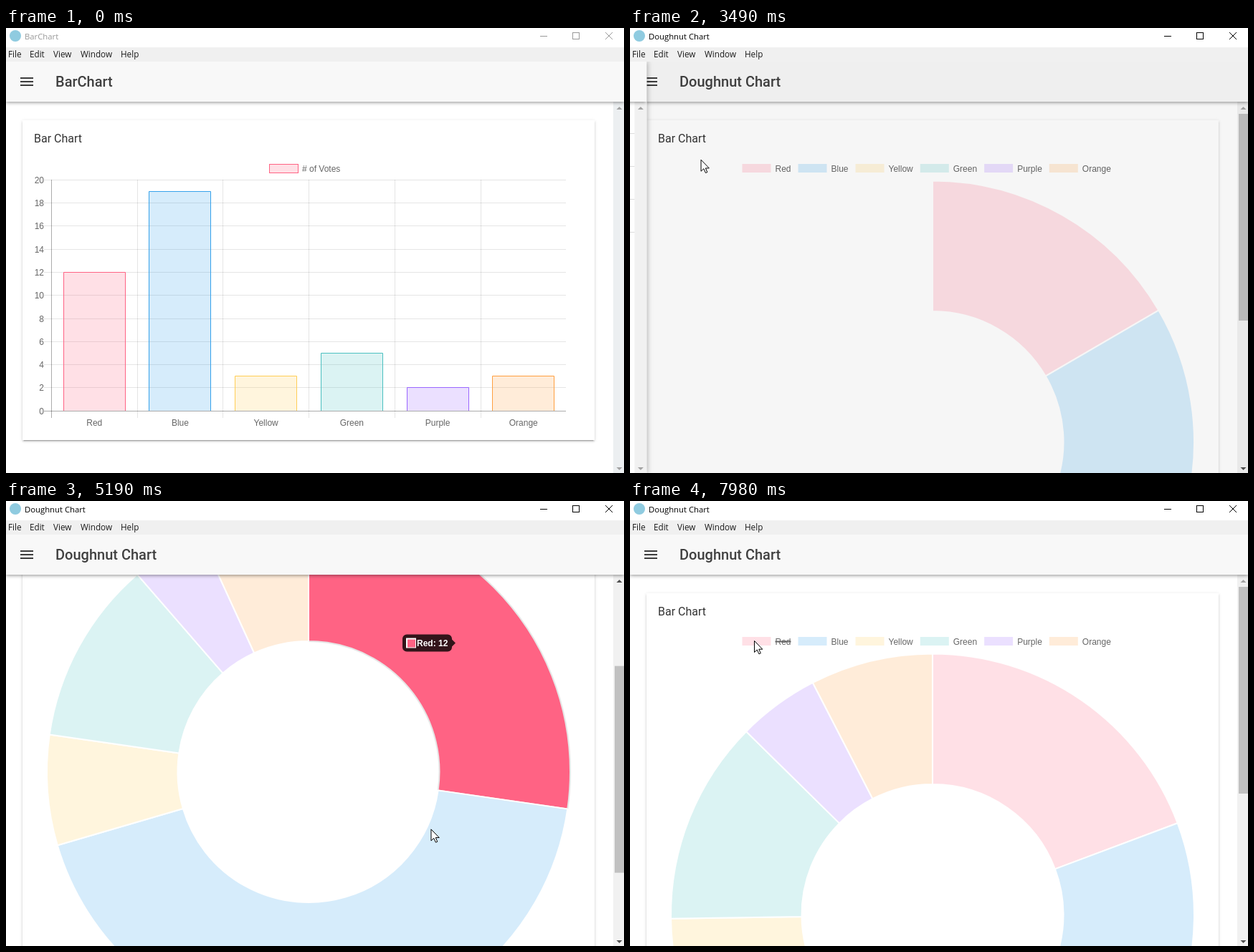
An HTML page with a canvas that plays this animation: 862 by 622 pixels, repeating every 8000 ms.

```html
<!DOCTYPE html>
<html lang="en">
<head>
<meta charset="utf-8">
<title>Charts</title>
<style>
  html, body { margin: 0; width: 100%; height: 100%; overflow: hidden; background: #fff; }
  canvas { display: block; }
</style>
</head>
<body>
<canvas id="stage" width="862" height="622"></canvas>
<script>
const ctx = document.getElementById('stage').getContext('2d');
const W = 862, H = 622, LOOP = 8000, TOP = 103, PAGE_W = 847;
const TAU = Math.PI * 2;
const UI = '"Open Sans", "Noto Sans", sans-serif';
const APP = 'Roboto, sans-serif';
const CHART = '12px "Liberation Sans", Arial, sans-serif';

const LABELS = ['Red', 'Blue', 'Yellow', 'Green', 'Purple', 'Orange'];
const VOTES = [12, 19, 3, 5, 2, 3];
const RGB = ['255,99,132', '54,162,235', '255,206,86', '75,192,192', '153,102,255', '255,159,64'];
const MENU = ['BarChart', 'DoughnutChart', 'LineChart', 'PolarChart', 'RadarChart'];
const tint = (i, a) => `rgba(${RGB[i]},${a})`;

// Event times in ms
const FOCUS = 1690, OPEN = 1810, SWITCH = 3330, GROW = 3282, HIDE = 7898;
const RING = { x: 422, y: 578.5, out: 365, inn: 182.5 };

// time, x, y of the pointer tip
const POINTER = [
  [230, 544, 594], [620, 320, 330], [1000, 91, 90], [1080, 87, 89], [1310, 53, 83],
  [1460, 40, 79], [2150, 40, 79], [2320, 50, 85], [2550, 80, 118], [2800, 80, 118],
  [3100, 92, 173], [3330, 92, 173], [3600, 103, 191], [4120, 103, 191], [4450, 380, 265],
  [4750, 600, 310], [5000, 625, 360], [5100, 620, 395], [5190, 593, 458], [5400, 480, 530],
  [5700, 300, 430], [5950, 235, 320], [6200, 200, 268], [6360, 195, 254], [6700, 195, 254],
  [7000, 150, 150], [7220, 125, 50], [7510, 145, 178], [7660, 173, 195]
];
const SCROLL = [
  [4560, 0], [4700, 100], [5000, 100], [5110, 200], [5900, 200], [6030, 300],
  [6790, 300], [6910, 200], [7040, 200], [7160, 100], [7290, 100], [7410, 0]
];

const clamp = v => Math.max(0, Math.min(1, v));
const easeOut = (v, n) => 1 - Math.pow(1 - clamp(v), n);

function track(keys, t) {
  if (t <= keys[0][0]) return keys[0].slice(1);
  for (let i = 1; i < keys.length; i++) {
    const a = keys[i - 1], b = keys[i];
    if (t < b[0]) {
      const k = (t - a[0]) / (b[0] - a[0]);
      return a.slice(1).map((v, j) => v + (b[j + 1] - v) * k);
    }
  }
  return keys[keys.length - 1].slice(1);
}

function rect(x, y, w, h, color) {
  ctx.fillStyle = color;
  ctx.fillRect(x, y, w, h);
}

function text(str, x, y, font, color, align = 'left') {
  ctx.font = font;
  ctx.fillStyle = color;
  ctx.textAlign = align;
  ctx.fillText(str, x, y);
}

function line(x1, y1, x2, y2, color, width = 1) {
  ctx.strokeStyle = color;
  ctx.lineWidth = width;
  ctx.beginPath();
  ctx.moveTo(x1, y1);
  ctx.lineTo(x2, y2);
  ctx.stroke();
}

function shadowRect(x, y, w, h, color, dy, blur, alpha) {
  ctx.save();
  ctx.shadowColor = `rgba(0,0,0,${alpha})`;
  ctx.shadowOffsetY = dy;
  ctx.shadowBlur = blur;
  rect(x, y, w, h, color);
  ctx.restore();
}

function triangle(x, y, dir, color) {
  ctx.fillStyle = color;
  ctx.beginPath();
  ctx.moveTo(x - 4, y + 2 * dir);
  ctx.lineTo(x + 4, y + 2 * dir);
  ctx.lineTo(x, y - 2 * dir);
  ctx.fill();
}

function windowBar(t) {
  const active = t >= FOCUS, ink = active ? '#000' : '#999';
  rect(0, 0, W, 27, '#fff');
  rect(0, 27, W, 20, '#f0f0f0');
  ctx.fillStyle = '#8fcbe0';
  ctx.beginPath();
  ctx.arc(13, 11, 8, 0, TAU);
  ctx.fill();
  text(t < SWITCH ? 'BarChart' : 'Doughnut Chart', 26, 16, '11.3px ' + UI, ink);
  line(745, 11.5, 755, 11.5, ink);
  ctx.strokeRect(790.5, 6.5, 9, 9);
  line(836, 6, 846, 16, ink);
  line(846, 6, 836, 16, ink);
  [['File', 3], ['Edit', 33], ['View', 66], ['Window', 104], ['Help', 160]]
    .forEach(([s, x]) => text(s, x, 41, '11.7px ' + UI, '#1a1a1a'));
}

function toolbar(t) {
  shadowRect(0, 47, W, 56, '#f8f8f8', 1, 5, 0.45);
  for (const y of [69, 74, 79]) rect(20, y, 18, 2, '#3c3c3c');
  text(t < SWITCH ? 'BarChart' : 'Doughnut Chart', 69, 82, '500 20px ' + APP, '#404040');
}

function card(bottom) {
  const h = bottom - 129;
  shadowRect(25, 131, 794, h - 4, '#fff', 3, 1, 0.2);
  shadowRect(23, 129, 798, h, '#fff', 2, 2, 0.14);
  shadowRect(23, 129, 798, h, '#fff', 1, 5, 0.12);
  text('Bar Chart', 39, 160, '16px ' + APP, '#333');
}

function barChart() {
  card(576);
  rect(367, 190, 40, 12, tint(0, 0.2));
  ctx.strokeStyle = tint(0, 1);
  ctx.lineWidth = 1;
  ctx.strokeRect(367.5, 190.5, 40, 12);
  text('# of Votes', 413, 201, CHART, '#666');

  const step = 119.7, unit = 16.15;
  for (let v = 0; v <= 20; v += 2) {
    const y = Math.floor(535.3 - v * unit) + 0.5;
    line(53, y, 781, y, v ? 'rgba(0,0,0,.1)' : 'rgba(0,0,0,.33)');
    text(v, 53, y + 4, CHART, '#666', 'right');
  }
  LABELS.forEach((label, i) => {
    const x = Math.floor(63.5 + i * step) + 0.5, mid = 63.4 + (i + 0.5) * step;
    line(x, 212, x, 545, i ? 'rgba(0,0,0,.1)' : 'rgba(0,0,0,.33)');
    const l = Math.floor(mid - 43) + 0.5, r = l + 86;
    const y = Math.floor(535.3 - VOTES[i] * unit) + 0.5;
    rect(l, y, r - l, 535 - y, tint(i, 0.2));
    ctx.strokeStyle = tint(i, 1);
    ctx.beginPath();
    ctx.moveTo(l, 535);
    ctx.lineTo(l, y);
    ctx.lineTo(r, y);
    ctx.lineTo(r, 535);
    ctx.stroke();
    text(label, mid, 556, CHART, '#666', 'center');
  });
}

// Arc angles, clockwise from the top
function slices(t) {
  const grow = easeOut((t - GROW) / 1000, 4);
  const hide = easeOut((t - HIDE) / 1000, 4);
  let at = 0;
  return VOTES.map((v, i) => {
    const after = i ? v / 32 : 0;
    const size = (v / 44 + (after - v / 44) * hide) * TAU * grow;
    const s = { from: at, to: at + size };
    at += size;
    return s;
  });
}

function hovered(t, arcs) {
  if (t < 4200 || t >= 7510) return -1;
  const [x, y] = track(POINTER, t - 90), [scroll] = track(SCROLL, t - 90);
  if (y < TOP) return -1;
  const dx = x - RING.x, dy = y + scroll - RING.y, d = Math.hypot(dx, dy);
  if (d < RING.inn || d > RING.out) return -1;
  const a = (Math.atan2(dx, -dy) + TAU) % TAU;
  return arcs.findIndex(s => a >= s.from && a < s.to);
}

function tooltip(i, arc) {
  const mid = (arc.from + arc.to) / 2, r = (RING.inn + RING.out) / 2;
  const px = RING.x + Math.sin(mid) * r, y = Math.round(RING.y - Math.cos(mid) * r) - 12.5;
  const label = `${LABELS[i]}: ${VOTES[i]}`;
  ctx.font = 'bold ' + CHART;
  const w = Math.round(ctx.measureText(label).width + 26);
  const x = Math.round(px > RING.x ? px - 7 - w : px + 7);
  ctx.fillStyle = 'rgba(0,0,0,.8)';
  ctx.beginPath();
  ctx.roundRect(x, y, w, 24, 6);
  ctx.moveTo(x + w, y + 7);
  ctx.lineTo(x + w + 5, y + 12);
  ctx.lineTo(x + w, y + 17);
  ctx.fill();
  rect(x + 5, y + 5, 14, 14, '#fff');
  rect(x + 7, y + 7, 11, 11, tint(i, 1));
  text(label, x + 20, y + 16.5, 'bold ' + CHART, '#fff');
}

function doughnut(t) {
  card(960);
  let x = 156.5;
  LABELS.forEach((label, i) => {
    rect(x, 190, 40, 12, tint(i, 0.2));
    text(label, x + 46, 201, CHART, '#666');
    const w = ctx.measureText(label).width;
    if (!i && t >= HIDE) line(x + 46, 196.5, x + 46 + w, 196.5, '#666', 2);
    x += 56 + w;
  });

  const arcs = slices(t), hot = hovered(t, arcs), q = TAU / 4;
  ctx.lineJoin = 'bevel';
  arcs.forEach((s, i) => {
    if (s.to - s.from < 1e-4) return;
    ctx.beginPath();
    ctx.arc(RING.x, RING.y, RING.out, s.from - q, s.to - q);
    ctx.arc(RING.x, RING.y, RING.inn, s.to - q, s.from - q, true);
    ctx.closePath();
    ctx.fillStyle = tint(i, i === hot ? 1 : 0.2);
    ctx.fill();
    ctx.strokeStyle = i === hot ? '#e6e6e6' : '#fff';
    ctx.lineWidth = 2;
    ctx.stroke();
  });
  if (hot >= 0) tooltip(hot, arcs[hot]);
}

function scrollbar(t, scroll) {
  const long = t >= SWITCH;
  rect(PAGE_W, TOP, 15, H - TOP, long ? '#f1f1f1' : '#eceff1');
  if (long) rect(849, 120 + scroll * 0.553, 13, 289, '#c1c1c1');
  triangle(855.5, 112, 1, scroll > 1 ? '#505050' : '#a3a3a3');
  triangle(855.5, 616, -1, long ? '#505050' : '#a3a3a3');
}

function sideMenu(t) {
  const p = t < SWITCH ? easeOut((t - OPEN) / 380, 3) : 1 - easeOut((t - SWITCH + 40) / 380, 3);
  if (p <= 0) return;
  ctx.save();
  ctx.beginPath();
  ctx.rect(0, 47, W, H - 47);
  ctx.clip();
  rect(0, 47, W, H - 47, `rgba(0,0,0,${0.355 * p})`);
  ctx.translate(-310 * (1 - p), 0);
  shadowRect(0, 47, 301, H - 47, '#fefefe', 0, 8, 0.4);
  ctx.beginPath();
  ctx.rect(0, 47, 301, H - 47);
  ctx.clip();
  rect(284, TOP, 17, H - TOP, '#f1f1f1');
  triangle(292.5, 112, 1, '#a3a3a3');
  triangle(292.5, 616, -1, '#a3a3a3');
  shadowRect(0, 47, 301, 56, '#f8f8f8', 1, 5, 0.45);
  text('Menu', 13, 82, '500 20px ' + APP, '#404040');
  MENU.forEach((item, i) => {
    text(item, 13, 130 + i * 46, '16px ' + APP, '#2c2c2c');
    if (i) rect(13, 101 + i * 46, 271, 1, '#dcdcdc');
  });
  ctx.restore();
}

const ARROW = new Path2D('M.5 .5V16.5L4.3 13L6.9 18.8L9.3 17.8L6.8 12.2H11.8Z');
const HAND = new Path2D('M-2 13.5V2Q-2 0 0 0Q2 0 2 2V7Q4 6.6 5 8Q7 7.6 7.6 9Q9 9 9 11V15.5L7 19.5V22H-2V20L-6 14.5Q-8 12 -6 11.2Q-4.5 10.8 -2 13.5Z');
const KNUCKLES = new Path2D('M2 7V12M5 8V12M7.6 9.5V12');
const BEAM = new Path2D('M-3 -7.5H-1L.5 -6.5L2 -7.5H4M.5 -6.5V7.5M-3 8.5H-1L.5 7.5L2 8.5H4');

function pointer(t) {
  if (t < 230) return;
  const [x, y] = track(POINTER, t);
  const beam = t >= 2000 && t < 2480;
  const hand = !beam && t > 1240 && t < 3400;
  ctx.save();
  ctx.translate(x, y);
  ctx.lineWidth = 1;
  ctx.lineJoin = 'round';
  ctx.strokeStyle = '#000';
  ctx.fillStyle = '#fff';
  if (beam) {
    ctx.stroke(BEAM);
  } else {
    const shape = hand ? HAND : ARROW;
    ctx.fill(shape);
    ctx.stroke(shape);
    if (hand) ctx.stroke(KNUCKLES);
  }
  ctx.restore();
}

function draw(t) {
  const [scroll] = track(SCROLL, t);
  rect(0, 0, W, H, '#fff');
  ctx.save();
  ctx.beginPath();
  ctx.rect(0, TOP, PAGE_W, H - TOP);
  ctx.clip();
  ctx.translate(0, -scroll);
  if (t < SWITCH) barChart();
  else doughnut(t);
  ctx.restore();
  scrollbar(t, scroll);
  toolbar(t);
  windowBar(t);
  sideMenu(t);
  pointer(t);
}

function tick() {
  draw(performance.now() % LOOP);
  requestAnimationFrame(tick);
}
tick();
</script>
</body>
</html>
```
